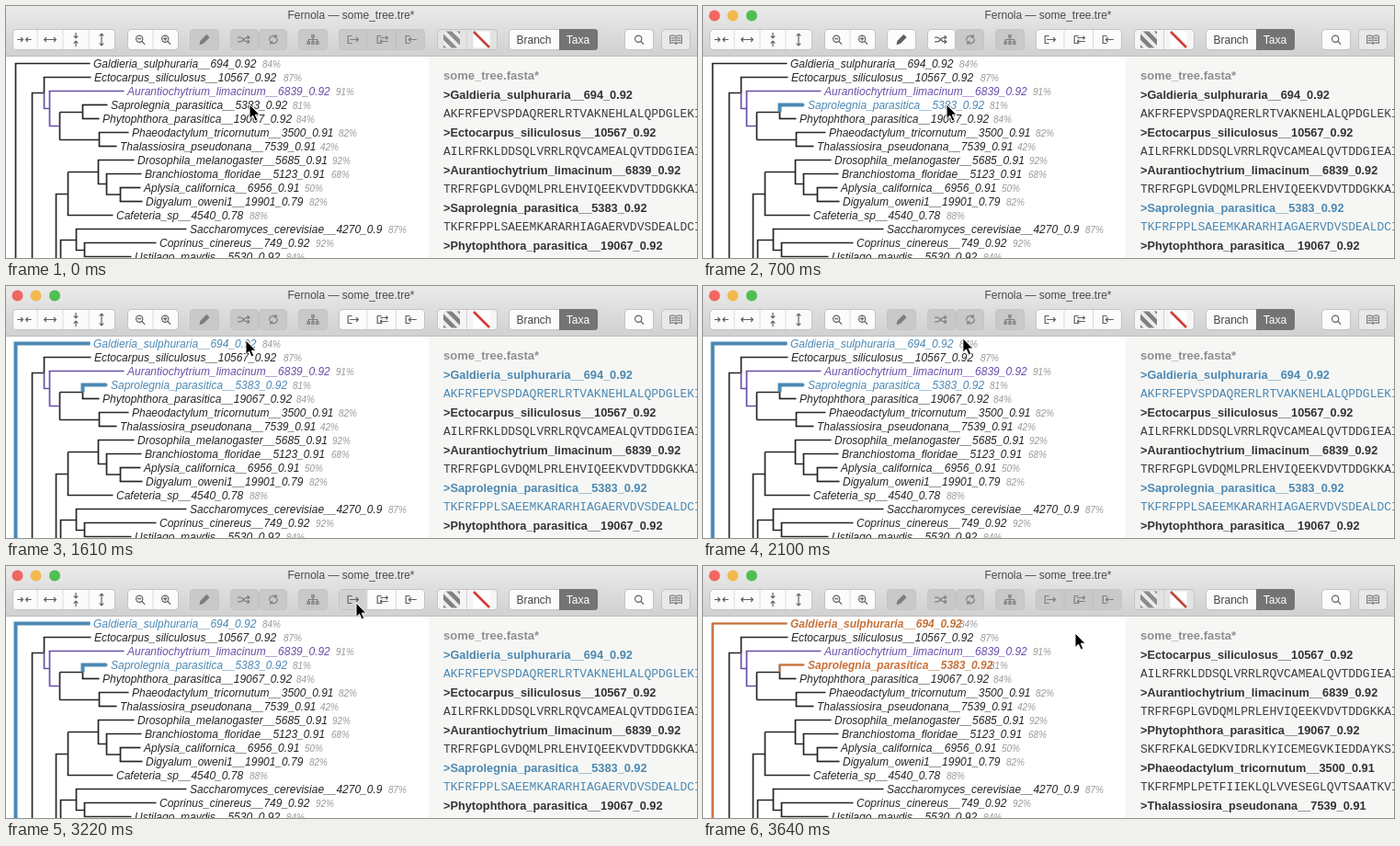
These frames come from a looping animation (752x274 px, 3.71 s). An HTML page:

```html
<!DOCTYPE html>
<html lang="en">
<head>
<meta charset="utf-8">
<title>Tree viewer</title>
<style>
html, body { margin: 0; width: 100%; height: 100%; overflow: hidden; background: #fff; }
svg { display: block; width: 752px; height: 274px; }
text { font-family: "Liberation Sans", Arial, sans-serif; white-space: pre; }
.name { font-size: 12px; font-style: italic; }
.pct { font-size: 10px; font-style: italic; fill: #989898; }
.head { font-size: 12.75px; font-weight: bold; }
.seq { font-family: "Liberation Mono", monospace; font-size: 13px; }
.icon { fill: none; stroke-width: 1.5; stroke-linecap: round; stroke-linejoin: round; }
</style>
</head>
<body>
<svg viewBox="0 0 752 274">
  <defs>
    <linearGradient id="bar" x2="0" y2="1">
      <stop stop-color="#ebeaeb"/><stop offset="1" stop-color="#d1d0d1"/>
    </linearGradient>
    <clipPath id="swatch"><path d="M-9-9H9V9H-9Z"/></clipPath>
  </defs>
  <rect width="752" height="274" fill="#fff"/>
  <g id="tree"></g>
  <rect x="460" y="55" width="292" height="219" fill="#f6f7f4"/>
  <g id="panel"></g>
  <rect width="752" height="55" fill="url(#bar)"/>
  <path d="M0 54.5H752" stroke="#bdbcbd"/>
  <g id="lights">
    <circle cx="12.5" cy="10.5" r="6" fill="#f0675f"/>
    <circle cx="32.5" cy="10.5" r="6" fill="#f3b84c"/>
    <circle cx="53" cy="10.5" r="6" fill="#4fbf52"/>
  </g>
  <text x="375.5" y="14" font-size="12" fill="#4a4a4a" text-anchor="middle">Fernola — some_tree.tre*</text>
  <g id="tools"></g>
  <path id="cursor" d="M0 0V15.5L3.6 12.2L6.2 18L8.8 16.8L6.3 11.2H11Z" fill="#000" stroke="#fff"/>
</svg>
<script>
const LOOP = 3710;
const BLUE = '#4c88b3', ORANGE = '#c8703a', PURPLE = '#6a4dab', INK = '#252528';
const $ = id => document.getElementById(id);

// name, label x, support x, support, branch start x
const taxa = [
  ['Galdieria_sulphuraria__694_0.92', 95, 279, 84, 10],
  ['Ectocarpus_siliculosus__10567_0.92', 96, 302, 87, 41],
  ['Aurantiochytrium_limacinum__6839_0.92', 132, 359, 91, 47],
  ['Saprolegnia_parasitica__5383_0.92', 114, 312, 81, 83],
  ['Phytophthora_parasitica__19067_0.92', 105, 316, 84, 83],
  ['Phaeodactylum_tricornutum__3500_0.91', 137, 362, 82, 101],
  ['Thalassiosira_pseudonana__7539_0.91', 124, 342, 42, 101],
  ['Drosophila_melanogaster__5685_0.91', 143, 355, 92, 100],
  ['Branchiostoma_floridae__5123_0.91', 151, 354, 68, 109],
  ['Aplysia_californica__6956_0.91', 150, 325, 50, 124],
  ['Digyalum_oweni1__19901_0.79', 152, 330, 82, 124],
  ['Cafeteria_sp__4540_0.78', 120, 265, 88, 67],
  ['Saccharomyces_cerevisiae__4270_0.9', 200, 416, 87, 76],
  ['Coprinus_cinereus__749_0.92', 167, 337, 92, 85],
  ['Ustilago_maydis__5530_0.92', 140, 305, 84, 85]
];
const seqs = [
  'AKFRFEPVSPDAQRERLRTVAKNEHLALQPDGLEKI',
  'AILRFRKLDDSQLVRRLRQVCAMEALQVTDDGIEAI',
  'TRFRFGPLGVDQMLPRLEHVIQEEKVDVTDDGKKAI',
  'TKFRFPPLSAEEMKARARHIAGAERVDVSDEALDCI',
  'SKFRFKALGEDKVIDRLKYICEMEGVKIEDDAYKSI',
  'TKFRFMPLPETFIIEKLQLVVESEGLQVTSAATKVI'
];
const inner = 'M10 62V274M28 274V94H41M41 77V94M58 115V145M58 115H83M83 107V122M58 145H101M101 137V152' +
  'M54 274V204H67M67 180V227M67 180H100M100 167V193H109M109 182V204.5H124M124 197V212' +
  'M59 274V254H76M76 242V265H85M85 257V272';
const purple = 'M41 94V111H47M47 92V130H58';

// selected taxa per phase: none, one, two, extracted
const picked = [[], [3], [0, 3], [0, 3]];
const stem = { 0: 'M10 274V62H91', 3: 'M83 115V107H109' };

const line = (d, color, w) => `<path d="${d}" fill="none" stroke="${color}" stroke-width="${w}"/>`;

function treeMarkup(phase) {
  const sel = picked[phase], done = phase === 3;
  const hue = done ? ORANGE : BLUE;
  let lines = line(inner, INK, 1.7) + line(purple, PURPLE, 1.7), labels = '';
  taxa.forEach(([name, x, px, pct, x0], i) => {
    const y = 62 + 15 * i, on = sel.includes(i);
    const color = on ? hue : i === 2 ? PURPLE : INK;
    lines += line(`M${x0 - .8} ${y}H${x - 4}`, color, 1.7);
    if (on) lines += line(stem[i], hue, done ? 1.8 : 4);
    labels += `<text class="pct" x="${px}" y="${y + 4.5}">${pct}%</text>` +
      `<text class="name" x="${x}" y="${y + 4.5}" fill="${color}"${on && done ? ' font-weight="bold"' : ''}>${name}</text>`;
  });
  return `<g transform="translate(.5 .5)">${lines}</g>${labels}`;
}

function panelMarkup(phase) {
  const sel = picked[phase];
  let out = '<text x="476" y="80" font-size="13" font-weight="bold" fill="#8e8e8e">some_tree.fasta*</text>';
  let rows = taxa.map((t, i) => i);
  if (phase === 3) rows = rows.filter(i => !sel.includes(i));
  rows.slice(0, 5).forEach((i, k) => {
    const y = 101 + 41 * k, on = sel.includes(i);
    out += `<text class="head" x="476" y="${y}" fill="${on ? BLUE : '#333'}">&gt;${taxa[i][0]}</text>` +
      `<text class="seq" x="476" y="${y + 20}" fill="${on ? BLUE : '#3c3c3c'}">${seqs[i] || ''}</text>`;
  });
  return out;
}

const lens = 'M2.5 2.5L6 6M3.5-1A4.5 4.5 0 1 1-5.5-1A4.5 4.5 0 1 1 3.5-1';
const box = 'M-1-5H-6V5H-1';
const icons = {
  inward: 'M-9 0H-2M-4.5-2.5L-2 0L-4.5 2.5M9 0H2M4.5-2.5L2 0L4.5 2.5',
  outward: 'M-8 0H8M-5.5-2.5L-8 0L-5.5 2.5M5.5-2.5L8 0L5.5 2.5',
  minus: lens + 'M-3-1H1',
  plus: lens + 'M-3-1H1M-1-3V1',
  pencil: 'M-6 6L-5 2L3-6L6-3L-2 5Z',
  shuffle: 'M-8-3H-5C-1-3 0 3 4 3H7M-8 3H-5C-1 3 0-3 4-3H7M5-5L7.5-3L5-1M5 1L7.5 3L5 5',
  rotate: 'M-5 1A5 5 0 0 1 4-3M4-6V-3H1M5-1A5 5 0 0 1-4 3M-4 6V3H-1',
  nodes: 'M0-3V0M-6 3V0H6V3M0 0V3M-1.5-6H1.5V-3H-1.5ZM-7.5 3H-4.5V6H-7.5ZM-1.5 3H1.5V6H-1.5ZM4.5 3H7.5V6H4.5Z',
  out: box + 'M-3 0H8M5.5-2.5L8 0L5.5 2.5',
  both: box + 'M-2-2.5H8M6-4.5L8-2.5L6-.5M8 2.5H-2M0 .5L-2 2.5L0 4.5',
  in: box + 'M8 0H-2M.5-2.5L-2 0L.5 2.5',
  find: lens,
  book: 'M0-4C-2-6-5-6-8-5V5C-5 4-2 4 0 6C2 4 5 4 8 5V-5C5-6 2-6 0-4V6M-6-2H-2M-6 1H-2M2-2H6M2 1H6'
};

// group left, width, phases in which it is enabled, then icon name, centre x, turn
const groups = [
  [7, 112, '0123', ['inward', 20], ['outward', 48], ['inward', 76, 90], ['outward', 104, 90]],
  [132, 56, '0123', ['minus', 146], ['plus', 174]],
  [200, 32, '1', ['pencil', 216]],
  [244, 31, '1', ['shuffle', 259]],
  [275, 31, '', ['rotate', 291]],
  [318, 32, '', ['nodes', 334]],
  [362, 94, '12', ['out', 377], ['both', 409], ['in', 440]],
  [673, 32, '0123', ['find', 689]],
  [713, 32, 'x', ['book', 729]]
];

const button = (x, w, fill) =>
  `<rect x="${x + .5}" y="25.5" width="${w - 1}" height="22" rx="3.5" fill="${fill}" stroke="#c4c3c4"/>`;

function toolsMarkup(phase, pressed) {
  let out = '';
  for (const [x, w, when, ...items] of groups) {
    const on = when.includes(phase);
    const ink = on ? '#606060' : '#7e7e7e';
    out += button(x, w, on ? '#fbfbfb' : when === 'x' ? '#e9e9e9' : '#cac9ca');
    if (pressed && x === 362) out += '<path d="M363 26H393V47H363Z" fill="#d2d2d2"/>';
    items.forEach(([id, cx, turn = 0], k) => {
      if (k) {
        const mid = (items[k - 1][1] + cx) / 2;
        out += line(`M${mid} 26V47`, on ? '#dcdcdc' : '#bebebe', 1);
      }
      const fill = id === 'pencil' ? ` style="fill:${ink}"` : '';
      out += `<path class="icon" d="${icons[id]}" stroke="${ink}"${fill} transform="translate(${cx} 36.5) rotate(${turn}) scale(.8)"/>`;
    });
  }
  const live = phase === 1 || phase === 2;
  let stripes = '';
  for (let c = -18; c <= 18; c += 12) stripes += `M${c - 12}-12L${c + 12} 12`;
  out += button(469, 66, live ? '#f5f5f5' : '#e3e3e3') + line('M501.5 26V47', '#d0d0d0', 1) +
    `<g transform="translate(485 36.5)" clip-path="url(#swatch)"><path d="M-9-9H9V9H-9Z" fill="#ececec"/>${line(stripes, live ? '#808080' : '#8c8c8c', 4.5)}</g>` +
    `<g transform="translate(517.5 36.5)"><path d="M-9-9H9V9H-9Z" fill="#fff"/>${line('M-8.5-8.5L8.5 8.5', live ? '#d23b30' : '#bf4438', 2.6)}</g>`;
  out += button(547, 97, '#fbfbfb') +
    '<path d="M602 25H640.5Q644 25 644 28.5V44.5Q644 48 640.5 48H602Z" fill="#757475"/>' +
    '<text x="574.5" y="40.5" font-size="12" fill="#444" text-anchor="middle">Branch</text>' +
    '<text x="622.5" y="40.5" font-size="12" fill="#fff" text-anchor="middle">Taxa</text>';
  return out;
}

// time, x, y
const path = [
  [0, 265, 107], [980, 265, 107], [1190, 263, 67], [1540, 261, 59], [1960, 261, 59],
  [2520, 401, 45], [3080, 381, 40], [3290, 381, 40], [3640, 405, 73], [LOOP, 405, 73]
];
const ease = p => p * p * (3 - 2 * p);

function cursorAt(t) {
  const i = path.findIndex((p, k) => k && t <= p[0]);
  const [t0, x0, y0] = path[i - 1], [t1, x1, y1] = path[i];
  const p = ease((t - t0) / (t1 - t0));
  return [x0 + (x1 - x0) * p, y0 + (y1 - y0) * p];
}

let shown = '';
function render(t) {
  const phase = t < 140 ? 0 : t < 1610 ? 1 : t < 3360 ? 2 : 3;
  const pressed = t >= 3220 && t < 3360;
  const key = phase + ':' + pressed;
  if (key !== shown) {
    shown = key;
    $('tree').innerHTML = treeMarkup(phase);
    $('panel').innerHTML = panelMarkup(phase);
    $('tools').innerHTML = toolsMarkup(phase, pressed);
    $('lights').setAttribute('opacity', phase ? 1 : 0);
  }
  $('cursor').setAttribute('transform', `translate(${cursorAt(t)})`);
}

let start;
function tick(now) {
  start ??= now;
  render((now - start) % LOOP);
  requestAnimationFrame(tick);
}
render(0);
requestAnimationFrame(tick);
</script>
</body>
</html>
```
